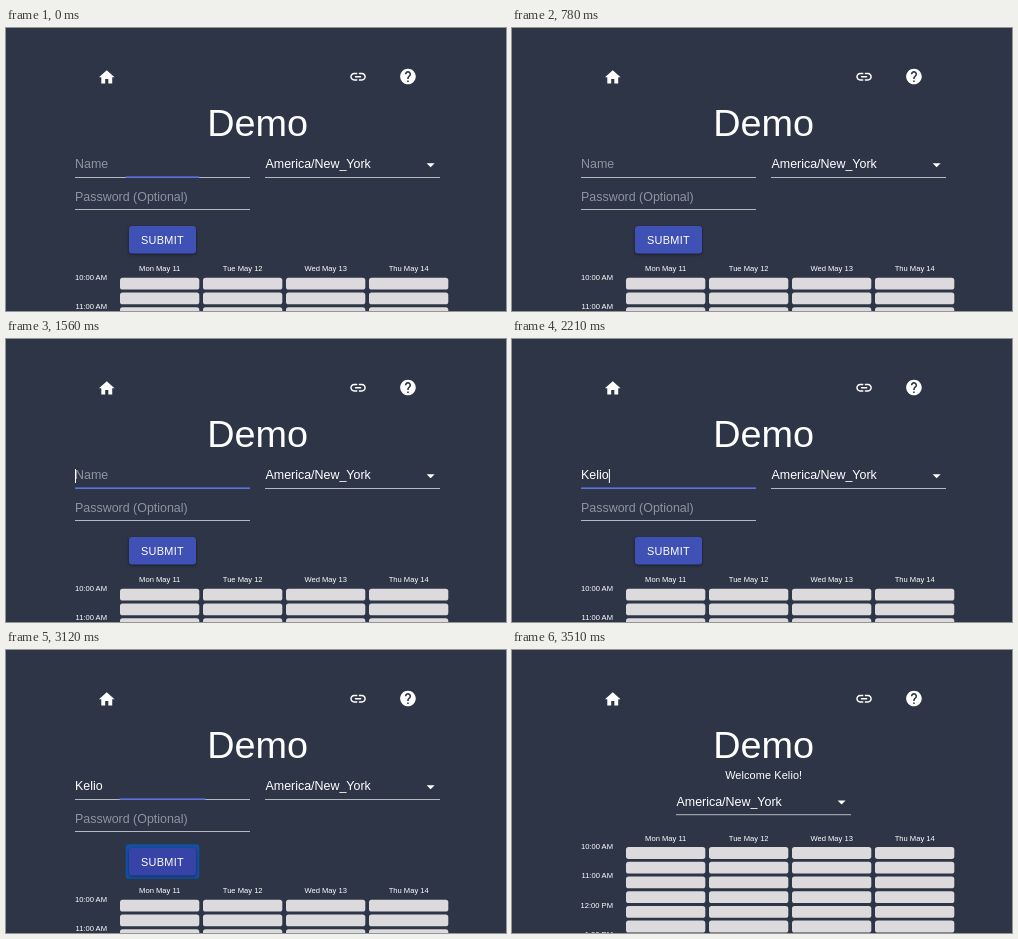
Write an HTML page that moves like this. It is 500 px wide and 283 px high and loops after 5.46 s.

```html
<!DOCTYPE html>
<html lang="en">
<head>
<meta charset="utf-8">
<title>Demo</title>
<style>
  html, body { margin: 0; width: 100%; height: 100%; overflow: hidden; background: #2d3547; }
  svg { display: block; width: 100%; height: 100%; font-family: "Liberation Sans", Arial, sans-serif; }
  text { fill: #fff; white-space: pre; }
  .field { font-size: 12.45px; }
  .hint { fill: #8f949e; }
  .small { font-size: 7.6px; }
  .rule { fill: #b4b8c0; }
  .icon { fill: #fff; }
  .slot { fill: #dcdadd; }
  #submit { filter: drop-shadow(0 1.5px 1.5px #0007); }
</style>
</head>
<body>
<svg viewBox="0 0 500 283">
  <g class="icon">
    <path transform="translate(91.4 40) scale(.78)" d="M10 20v-6h4v6h5v-8h3L12 3 2 12h3v8z"/>
    <path transform="translate(342.7 39.4) scale(.78)" d="M3.9 12c0-1.71 1.39-3.1 3.1-3.1h4V7H7c-2.76 0-5 2.24-5 5s2.24 5 5 5h4v-1.9H7c-1.71 0-3.1-1.39-3.1-3.1zM8 13h8v-2H8v2zm9-6h-4v1.9h4c1.71 0 3.1 1.39 3.1 3.1s-1.39 3.1-3.1 3.1h-4V17h4c2.76 0 5-2.24 5-5s-2.24-5-5-5z"/>
    <path transform="translate(392.6 39.2) scale(.78)" d="M12 2C6.48 2 2 6.48 2 12s4.48 10 10 10 10-4.48 10-10S17.52 2 12 2zm1 17h-2v-2h2v2zm2.07-7.75l-.9.92C13.45 12.9 13 13.5 13 15h-2v-.5c0-1.1.45-2.1 1.17-2.83l1.24-1.26c.37-.36.59-.86.59-1.41 0-1.1-.9-2-2-2s-2 .9-2 2H8c0-2.21 1.79-4 4-4s4 1.79 4 4c0 .88-.36 1.68-.93 2.25z"/>
  </g>
  <text x="251.7" y="108" font-size="37.8" text-anchor="middle">Demo</text>

  <g id="form">
    <text id="name" class="field" x="69" y="140.4"></text>
    <rect class="rule" x="69" y="149" width="175" height="1"/>
    <rect id="focusLine" y="148" height="1.7" fill="#4558c2"/>
    <rect id="caret" y="130" width="1" height="14" fill="#fff"/>
    <text class="field hint" x="69" y="173">Password (Optional)</text>
    <rect class="rule" x="69" y="181" width="175" height="1"/>
    <rect id="ring" x="119.7" y="194.3" width="73.6" height="34.4" rx="3" fill="#1550a4"/>
    <rect id="submit" x="123" y="198" width="67" height="27.5" rx="3"/>
    <text x="135" y="215.6" font-size="10.9" letter-spacing=".31">SUBMIT</text>
  </g>

  <text id="welcome" x="251.7" y="128.9" font-size="10.9" letter-spacing=".12" text-anchor="middle"></text>

  <g id="zone">
    <text class="field" x="259.5" y="140.4">America/New_York</text>
    <rect class="rule" x="259" y="149" width="175" height="1"/>
    <path class="icon" d="M420.6 135.3h8l-4 4z"/>
  </g>
  <g id="grid"></g>
</svg>
<script>
const LOOP = 5460, STEP = 130, NAME = 'Kelio';
const WELCOME_AT = 3510, BLUR_AT = 3120;
const $ = id => document.getElementById(id);
const clamp = v => Math.min(1, Math.max(0, v));
const easeOut = v => 1 - (1 - clamp(v)) ** 2;
const show = (id, on) => $(id).setAttribute('visibility', on ? 'visible' : 'hidden');

function buildGrid() {
  let out = '';
  ['Mon', 'Tue', 'Wed', 'Thu'].forEach((day, c) => {
    const x = 114 + 83 * c;
    out += `<text class="small" x="${x + 39.7}" y="243.4" text-anchor="middle">${day} May ${11 + c}</text>`;
    for (let r = 0; r < 6; r++)
      out += `<rect class="slot" x="${x}" y="${249.7 + 14.72 * r}" width="79.3" height="11.9" rx="2.6"/>`;
  });
  ['10:00 AM', '11:00 AM', '12:00 PM', '1:00 PM'].forEach((hour, i) => {
    out += `<text class="small" x="101" y="${251.6 + 29.4 * i}" text-anchor="end">${hour}</text>`;
  });
  $('grid').innerHTML = out;
}

// Share of the name field's underline that is highlighted
function focusAmount(t) {
  if (t < 1200) return .42 * (1 - clamp(t / 100));
  if (t < BLUR_AT) return easeOut((t - 1200) / 260);
  return 1 - easeOut((t - BLUR_AT + 60) / 200);
}

function draw(now) {
  const t = Math.floor(now % LOOP / STEP) * STEP;
  const welcome = t >= WELCOME_AT;
  const typed = NAME.slice(0, t < 1950 ? 0 : 1 + 2 * (t - 1950) / STEP);
  const focused = t >= 1300 && t < BLUR_AT;

  $('form').style.display = welcome ? 'none' : '';
  $('zone').setAttribute('transform', welcome ? 'translate(-95 15.2)' : '');
  $('grid').setAttribute('transform', welcome ? 'translate(0 -52.7)' : '');
  $('welcome').textContent = welcome ? `Welcome ${NAME}!` : '';
  if (!welcome) {
    $('name').textContent = typed || 'Name';
    $('name').classList.toggle('hint', !typed);
    const width = 175 * focusAmount(t);
    $('focusLine').setAttribute('x', 156.5 - width / 2);
    $('focusLine').setAttribute('width', width);
    $('caret').setAttribute('x', typed ? 69.2 + $('name').getComputedTextLength() : 69);
    show('caret', focused);
    show('ring', t >= BLUR_AT);
    const hover = clamp((t - 2470) / 390);
    const mix = (a, b) => Math.round(a + (b - a) * hover);
    $('submit').setAttribute('fill', `rgb(${mix(63, 55)},${mix(81, 67)},${mix(181, 166)})`);
  }
  requestAnimationFrame(tick);
}

let start;
function tick(now) {
  start ??= now;
  draw(now - start);
}

buildGrid();
draw(0);
</script>
</body>
</html>
```
